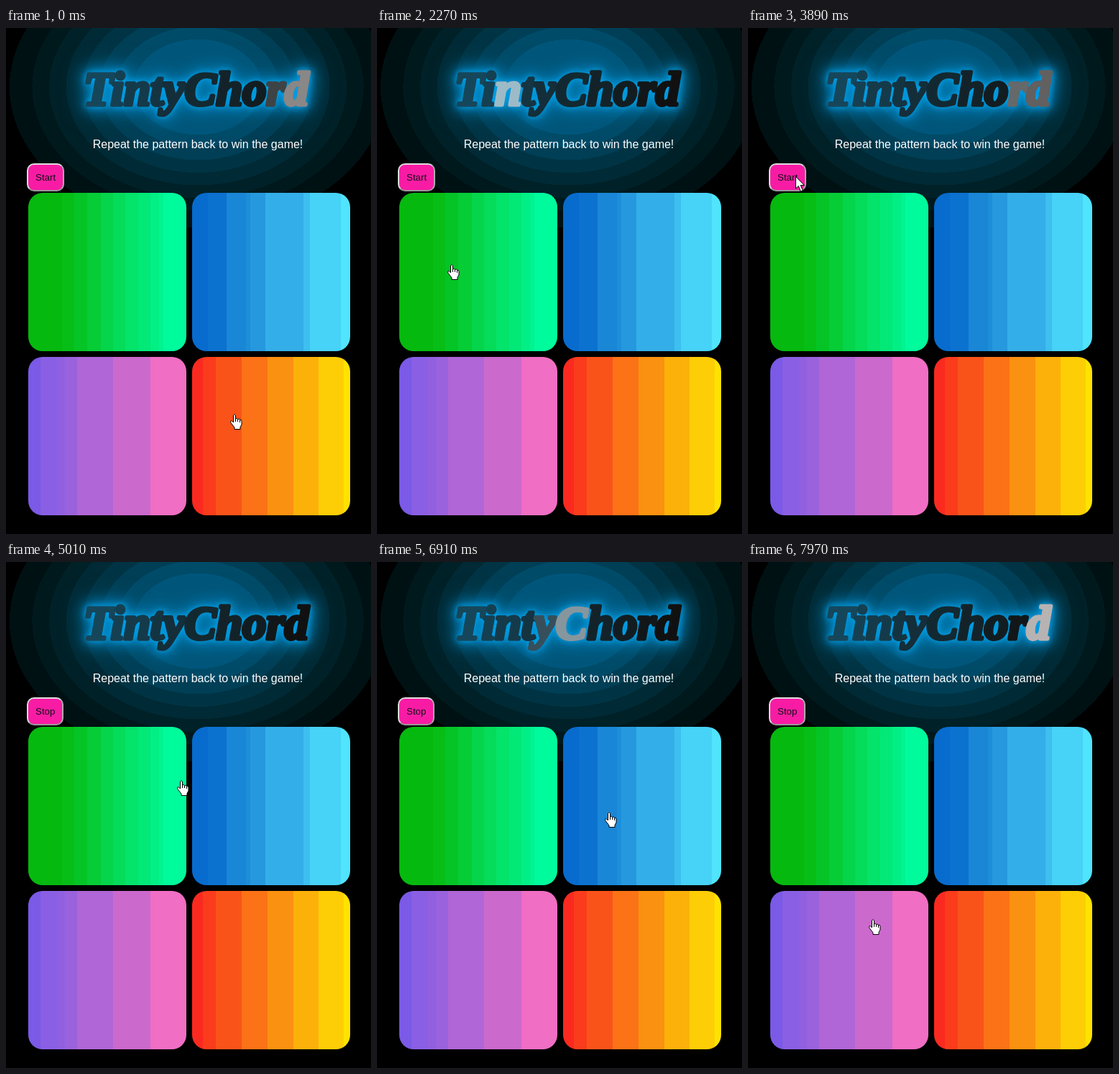
An HTML page that plays this animation: 508 px wide and 703 px high, repeating every 8000 ms.

```html
<!DOCTYPE html>
<html lang="en">
<head>
<meta charset="utf-8">
<title>TintyChord</title>
<style>
html, body { margin: 0; width: 100%; height: 100%; overflow: hidden; background: #000; }
body { position: relative; font-family: "Liberation Sans", Arial, sans-serif; }
body > * { position: absolute; box-sizing: border-box; }
#halo {
  inset: 0;
  background: radial-gradient(262px 195px at 267px 82px,
    #00567a 0 34%, #004b68 0 43%, #003f56 0 52%, #003444 0 61%, #002a35 0 70%,
    #002128 0 79%, #00191d 0 88%, #001113 0 100%, #000 0);
}
svg { left: 0; top: 0; width: 508px; height: 703px; }
.title { font: italic bold 66px "Liberation Serif", "Times New Roman", serif; stroke-width: 5px; stroke-linejoin: round; }
#glow { fill: #0b6f9c; stroke: #0b6f9c; filter: drop-shadow(0 0 5px #00a6f0) drop-shadow(0 0 10px #008ccc) drop-shadow(0 0 14px #00628c); }
p { margin: 0; left: 0; top: 153px; width: 534px; text-align: center; font-size: 16px; line-height: 18px; color: #fff; }
#button {
  left: 29px; top: 188px; height: 39px; padding: 10px; border: 2px solid; border-color: #ddd #aaa #999 #ddd;
  border-radius: 10px; background: #f81ca5; color: #111; font-size: 13.333px; line-height: 15px;
}
.tile { width: 220px; height: 220px; border-radius: 20px; }
.tile.lit { background: #20ecff !important; box-shadow: 0 -5px 40px rgba(64, 224, 240, .8); }
</style>
</head>
<body>
<div id="halo"></div>
<svg>
  <text id="glow" class="title" x="108" y="107">TintyChord</text>
  <text id="letters" class="title" x="108" y="107"></text>
</svg>
<p>Repeat the pattern back to win the game!</p>
<div id="button">Start</div>
<svg id="pointer" fill="#fff" stroke="#000" stroke-linejoin="round">
  <g id="hand">
    <path d="M-1.5 2Q0-.6 1.5 2V7Q3.2 5.6 4.5 7.5Q6.3 6.3 7.5 8.3Q9.8 7.5 10 10.5V15L8 18.5V21.5H0V19L-5 12.5Q-6.3 9.5-4 9.5L-1.5 12Z"/>
    <path d="M1.5 7V11M4.5 7.5V11M7.5 8.3V12" fill="none"/>
  </g>
  <path id="arrow" d="M.5.5V17L4.3 13.5L7.3 21L10.3 19.7L7.2 12.5H12.3Z"/>
</svg>
<script>
const LOOP = 8000, PULSE = 3950, STEP = 250, FIRST_PEAK = 1770;
const $ = id => document.getElementById(id);

// Each tile: left, top, then stripes as [right edge, colour]
const tiles = [
  [31, 229, [[47, '#05b90f'], [64, '#06be16'], [82, '#05c426'], [101, '#06cc36'], [118, '#05d54a'], [135, '#05dc5a'],
    [153, '#04e36a'], [170, '#02e978'], [182, '#02ef86'], [188, '#01f490'], [220, '#00fb9c']]],
  [259, 229, [[22, '#086bce'], [48, '#0c72d0'], [75, '#1a86d6'], [81, '#1d8eda'], [102, '#2699de'], [155, '#34aee9'],
    [164, '#3dbfef'], [207, '#47d2f7'], [220, '#50e4fd']]],
  [31, 457, [[17, '#7a5ae6'], [40, '#8a5fe3'], [51, '#9160e0'], [68, '#9b62dd'], [118, '#b066d6'],
    [170, '#cc69cd'], [220, '#f06ec3']]],
  [259, 457, [[15, '#fb2a20'], [33, '#fa3c1c'], [69, '#f9531a'], [105, '#fb7316'], [141, '#fb9110'],
    [176, '#fcb10a'], [211, '#fdce06'], [220, '#fee300']]]
].map(([x, y, stripes]) => {
  const el = document.createElement('div');
  let from = 0;
  const stops = stripes.map(([to, color]) => {
    const stop = `${color} ${from}px ${to}px`;
    from = to;
    return stop;
  });
  el.className = 'tile';
  el.style.cssText = `left:${x}px;top:${y}px;background:linear-gradient(90deg,${stops})`;
  document.body.insertBefore(el, $('pointer'));
  return { el, x, y };
});

const letters = [...'TintyChord'].map(char => {
  const el = document.createElementNS('http://www.w3.org/2000/svg', 'tspan');
  el.textContent = char;
  return $('letters').appendChild(el);
});

// Pointer path: time, x, y
const path = [
  [0, 318, 536], [210, 318, 536], [340, 318, 535], [1740, 318, 535], [1930, 255, 492], [2150, 150, 395],
  [2380, 62, 268], [2520, 44, 208], [2740, 46, 206], [2900, 58, 206], [3020, 66, 206], [4790, 66, 206],
  [4900, 150, 245], [5010, 244, 302], [5100, 260, 349], [6290, 260, 349], [6700, 323, 347],
  [7540, 323, 347], [7820, 174, 496], [LOOP, 174, 496]
];

const mix = (a, b, k) => a.map((v, i) => v + (b[i] - v) * k);

function pointerAt(t) {
  const i = path.findIndex(p => p[0] > t);
  const a = path[i - 1], b = path[i];
  return mix(a, b, (t - a[0]) / (b[0] - a[0])).slice(1).map(Math.round);
}

function draw(now) {
  const t = now % LOOP;

  letters.forEach((el, i) => {
    const d = (t - FIRST_PEAK - i * STEP + 3 * PULSE) % PULSE;
    const light = Math.max(0, 1 - Math.min(d, PULSE - d) / STEP);
    const dark = mix([22, 70, 90], [17, 17, 17], i / 9);
    const bright = mix([150, 190, 205], [184, 180, 180], i / 9);
    const color = `rgb(${mix(dark, bright, light)})`;
    el.style.fill = el.style.stroke = color;
  });

  const lit = t >= 5080 && t < 6260 || t >= 7100 && t < 7970;
  tiles[1].el.classList.toggle('lit', lit);
  $('button').textContent = t < 4070 ? 'Start' : 'Stop';

  const [x, y] = pointerAt(t);
  const over = tiles.some(s => x >= s.x && x < s.x + 220 && y >= s.y && y < s.y + 220);
  for (const [id, shown] of [['hand', over], ['arrow', !over]]) {
    $(id).setAttribute('transform', `translate(${x} ${y})`);
    $(id).style.display = shown ? '' : 'none';
  }
}

const start = performance.now();
function tick() {
  draw(performance.now() - start);
  requestAnimationFrame(tick);
}
tick();
</script>
</body>
</html>
```
